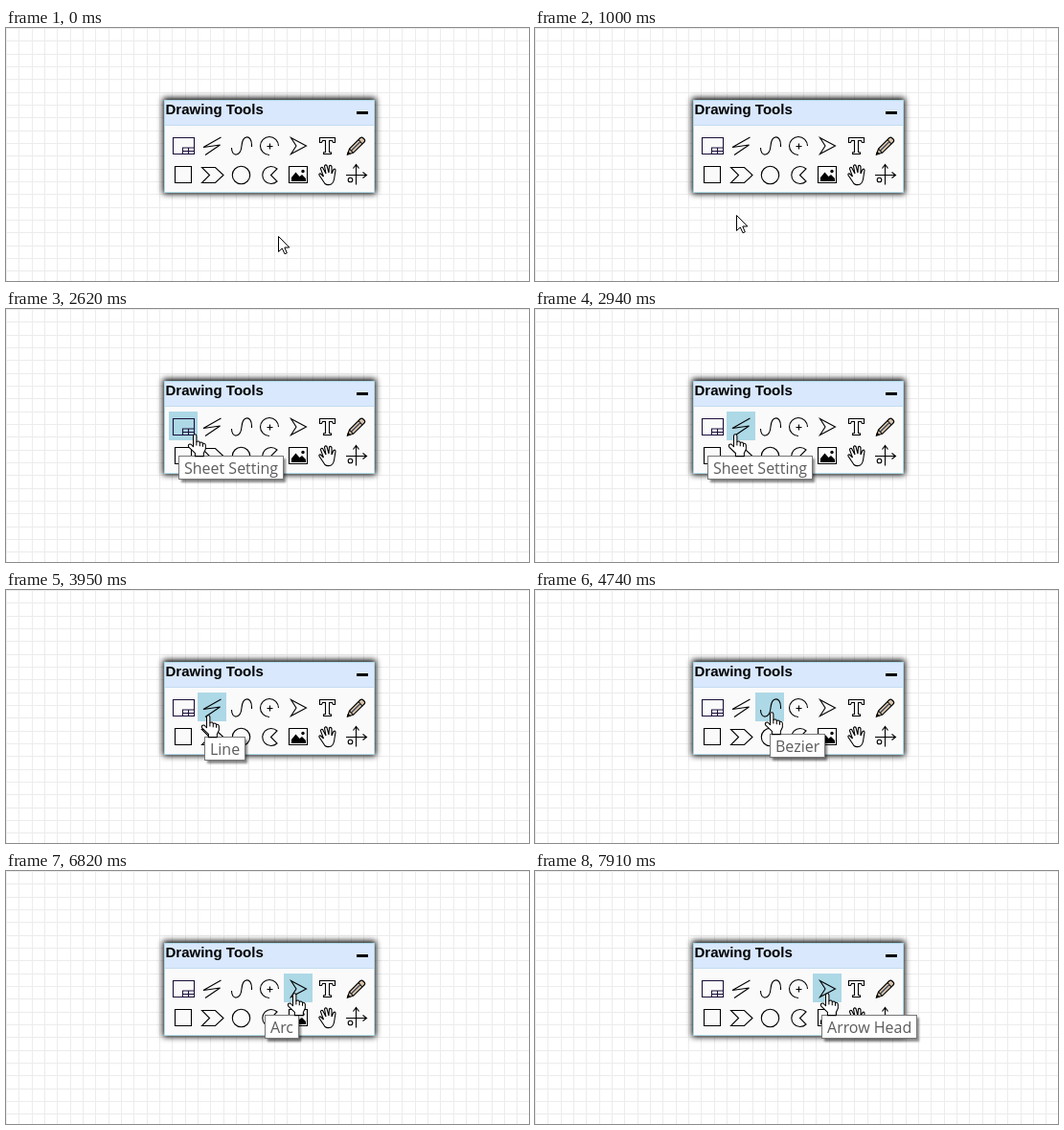
An HTML page for the animation above (7990 ms loop, 546 by 264 pixels).

```html
<!DOCTYPE html>
<html lang="en">
<head>
<meta charset="utf-8">
<title>Drawing Tools</title>
<style>
  html, body { margin: 0; width: 100%; height: 100%; overflow: hidden; background: #fff; }
  svg { display: block; }
  #grid { stroke: #ececec; }
  #icons { fill: none; stroke: #000; stroke-width: 1.1; }
  #title { font: bold 15px "Liberation Sans", Arial, sans-serif; }
  #label { font: 16px "Open Sans", "Noto Sans", sans-serif; fill: #5c5c5c; }
</style>
</head>
<body>
<svg width="546" height="264" viewBox="0 0 546 264">
  <defs>
    <filter id="blur" x="-10%" y="-20%" width="120%" height="140%"><feGaussianBlur stdDeviation="3"/></filter>
    <filter id="soft" x="-20%" y="-30%" width="140%" height="160%"><feGaussianBlur stdDeviation="1"/></filter>
  </defs>
  <path id="grid"/>

  <rect x="164" y="73" width="222" height="100" filter="url(#blur)"/>
  <rect x="165.5" y="75.5" width="219" height="96" fill="#fafafa" stroke="#add8e6"/>
  <rect x="166" y="76" width="218" height="25" fill="#d9e8fd"/>
  <path d="M166 101.5H384" stroke="#c3dcf0"/>
  <text id="title" x="166.5" y="90">Drawing Tools</text>
  <rect x="366" y="87" width="12" height="3"/>
  <rect id="cell" y="107" width="30" height="30" fill="#add8e6"/>

  <g id="icons">
    <path d="M174.5 114.5H196.5V131.5H174.5ZM184.5 131.5V125H196.5M184.5 128.5H196.5M190.5 125V131.5" stroke="#1c0f3c"/>
    <path d="M224.5 114L206 124.5L223.5 122L208 132.5"/>
    <path d="M235.5 125C235.5 135 245 134.5 246 123C247 111 256.5 111 256.5 122V124"/>
    <path d="M284.5 123A9.5 9.5 0 1 0 275 132.5M272.5 123.5H278.5M275.5 120.5V126.5"/>
    <path d="M297.5 114.5L313.5 123L297.5 131.5L303 123Z"/>
    <path d="M327.5 114.5H343.5V119.5H341.5L340.5 117.5H337.5V129.5L339.5 130V131.5H331.5V130L333.5 129.5V117.5H330.5L329.5 119.5H327.5Z"/>
    <path d="M356.5 132L358.5 126L370 114.5Q371.5 113.5 373 115L374 116Q375.5 117.5 374 119L362.5 130.3ZM358.5 126L362.5 130.3M368 116.5L372 121" fill="#d8c3a8"/>
    <path d="M360.5 128L370 118.5" stroke="#33405c"/>
    <path d="M356.5 132L357.3 129.5L359 131.2Z" fill="#000"/>
    <path d="M176.5 144.5H193.5V161.5H176.5Z"/>
    <path d="M204.5 145.5H218.5L227 153.5L218.5 161.5H204.5L212.5 153.5Z"/>
    <circle cx="245.5" cy="153.5" r="9.2"/>
    <path d="M283 147A9 9 0 1 0 283 160L276.5 153.5Z"/>
    <path d="M295.5 144.5H314.5V161.5H295.5Z"/>
    <path d="M298 160V156L302.5 150.5L306.5 155L309 153L313 157V160Z" fill="#000" stroke="none"/>
    <circle cx="310" cy="149.5" r="1.7" fill="#000" stroke="none"/>
    <path d="M333 162.5L327 153.5Q326.5 151.5 328.5 152L331.5 155L328.5 147Q328.5 145 330.5 145.5L334 152L332.5 144Q333.5 142 335 143.5L337 151L337.5 144Q339 142.5 340 144.5L340 152L342 147.5Q344 146.5 344 148.5L342.5 158Q342 161.5 339.5 163Q335.5 164.5 333 162.5Z"/>
    <path d="M365.5 163.5V143M362.5 146.5L365.5 142.5L368.5 146.5M355 153.5H376M372.5 150.5L376.5 153.5L372.5 156.5"/>
    <circle cx="359.5" cy="158.5" r="2.3"/>
  </g>

  <g id="tip">
    <rect class="box" x="3" y="3" height="25" opacity=".45" filter="url(#soft)"/>
    <rect class="box" x=".5" y=".5" height="24" fill="#fff" stroke="#767676"/>
    <text id="label" x="6" y="18.5"></text>
  </g>

  <circle id="press" cx="284.5" cy="217.5" r="12" fill="#ff0" fill-opacity=".47"/>
  <g id="pointer" fill="#fff" stroke="#000">
    <path id="arrow" d="M.5 .5V16.5L4.3 13L7 18.8L9.300 17.8L6.8 12H11.8Z"/>
    <g id="hand" stroke-linejoin="round" transform="scale(1.05)">
      <path d="M.5 13V2.3A1.6 1.6 0 0 1 3.7 2.3V8Q6.5 6.8 6.9 9Q9.6 7.9 10 10Q12.5 9.3 12.7 11.8V15.5L10.8 19.5V22.5H2.3V19.5L-4 13.5Q-5 11.5 -3.6 10.8Q-2 10 -.8 11.7Z"/>
      <path d="M3.7 8V12M6.9 9V12.5M10 10V13" fill="none"/>
    </g>
  </g>
</svg>
<script>
const $ = id => document.getElementById(id);
const LOOP = 7990, STEP = 75, GRID = 40 / 3, CELL = 30;
const start = { x: 284, y: 217 };

// Each move eases from the previous place to (x, y), bent towards "via" if given
const moves = [
  { at: 830, steps: 9, x: 180, y: 130, via: { x: 110, y: 175 } },
  { at: 2620, steps: 1, x: 195, y: 130 },
  { at: 2700, steps: 1, x: 198, y: 130 },
  { at: 2850, steps: 2, x: 207, y: 130 },
  { at: 3950, steps: 7, x: 245, y: 127 },
  { at: 5350, steps: 5, x: 270, y: 127 },
  { at: 6510, steps: 5, x: 299, y: 127 },
  { at: 7910, steps: 1, x: 303, y: 127 }
];

// Tooltips fade in below the resting pointer
const tips = [
  { at: 1920, steps: 3, text: 'Sheet Setting' },
  { at: 3320, steps: 2, text: 'Line' },
  { at: 4740, steps: 1, text: 'Bezier' },
  { at: 5980, steps: 2, text: 'Arc' },
  { at: 7220, steps: 1, text: 'Arrow Head' }
];

const lastIndex = (list, t) => list.filter(e => e.at <= t).length - 1;
const progress = (e, t) => Math.min(1, (Math.floor((t - e.at) / STEP) + 1) / e.steps);
const ease = p => p * p * (3 - 2 * p);
const mix = (a, b, p) => a + (b - a) * p;
const show = (el, on) => el.setAttribute('visibility', on ? 'visible' : 'hidden');
const place = (el, { x, y }) => el.setAttribute('transform', `translate(${x} ${y})`);

function pointerAt(t) {
  const i = lastIndex(moves, t);
  if (i < 0) return start;
  const to = moves[i], from = moves[i - 1] || start;
  const p = ease(progress(to, t));
  const along = k => to.via
    ? mix(mix(from[k], to.via[k], p), mix(to.via[k], to[k], p), p)
    : mix(from[k], to[k], p);
  return { x: Math.round(along('x')), y: Math.round(along('y')) };
}

function drawTip(t) {
  const tip = tips[lastIndex(tips, t)];
  show($('tip'), tip);
  if (!tip) return;
  const { x, y } = pointerAt(tip.at);
  place($('tip'), { x, y: y + 23 });
  $('tip').setAttribute('opacity', progress(tip, t));
  $('label').textContent = tip.text;
  const width = Math.round($('label').getComputedTextLength()) + 11;
  document.querySelectorAll('.box').forEach(box => box.setAttribute('width', width));
}

function drawGrid() {
  let d = '';
  for (let i = 0; i * GRID < 546; i++) {
    const p = Math.round(i * GRID) + .5;
    d += `M${p} 0V264M0 ${p}H546`;
  }
  $('grid').setAttribute('d', d);
}

function draw(now) {
  const t = now % LOOP;
  const pos = pointerAt(t);
  const over = pos.x >= 170 && pos.y >= 107 && pos.y < 137;
  place($('pointer'), pos);
  show($('hand'), over);
  show($('arrow'), !over);
  show($('cell'), over);
  $('cell').setAttribute('x', 170 + CELL * Math.floor((pos.x - 170) / CELL));
  show($('press'), t >= 450 && t < 830);
  drawTip(t);
  requestAnimationFrame(draw);
}

drawGrid();
requestAnimationFrame(draw);
</script>
</body>
</html>
```
